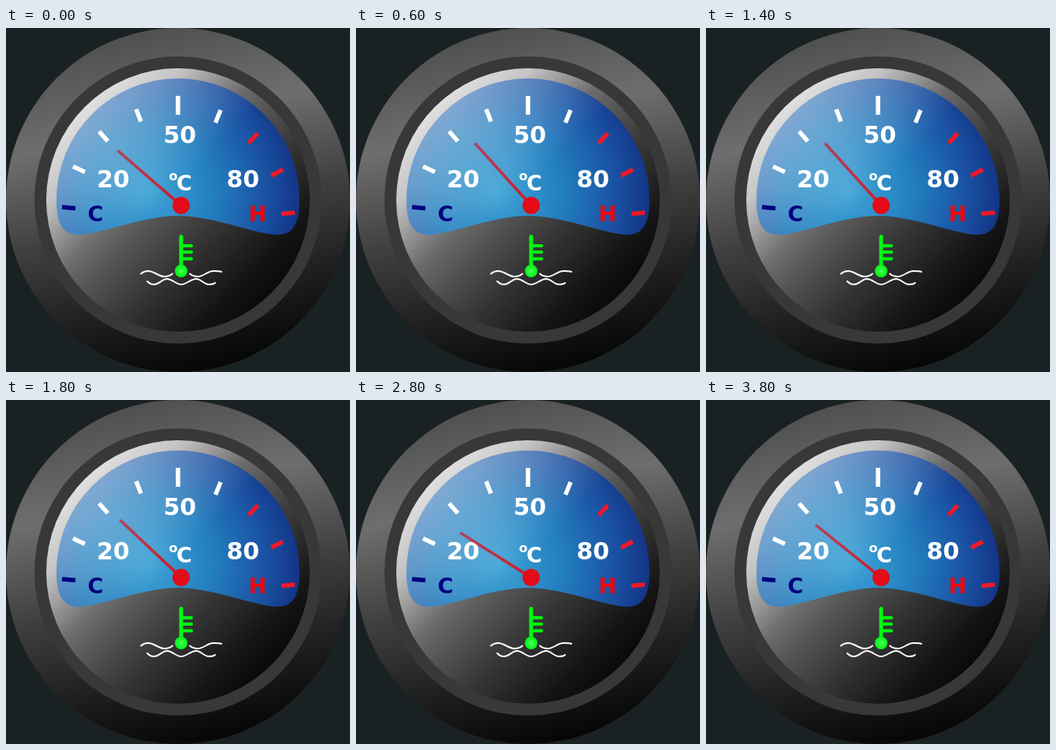
These frames come from a looping animation (436 by 436 pixels, 4 s). An HTML page:

```html
<!DOCTYPE html>
<html lang="en">
<head>
<meta charset="utf-8">
<title>Temperature gauge</title>
<style>
  html, body { margin: 0; width: 100%; height: 100%; overflow: hidden; background: #1a2122; }
  svg { display: block; width: 100vw; height: 100vh; }
  text { font: bold 30px "DejaVu Sans", Verdana, sans-serif; fill: #fff; }
  .letter { font-size: 27px; }
  .degree { font-size: 16px; }
  .ticks { fill: none; stroke-width: 5.5; }
  .needle {
    transform-origin: 222px 225px;
    animation: swing 4s steps(5, end) infinite;
  }
  @keyframes swing {
    0%, 50%, 100% { transform: rotate(40.9deg); }
    25% { transform: rotate(52.6deg); }
    75% { transform: rotate(30.1deg); }
  }
</style>
</head>
<body>
<svg viewBox="0 0 436 436">
  <defs>
    <linearGradient id="bezel" gradientUnits="userSpaceOnUse" x1="165" y1="0" x2="265" y2="430">
      <stop offset="0" stop-color="#4e4e4e"/>
      <stop offset=".28" stop-color="#6e6e6e"/>
      <stop offset=".55" stop-color="#404040"/>
      <stop offset=".8" stop-color="#1e1e1e"/>
      <stop offset="1" stop-color="#060606"/>
    </linearGradient>
    <linearGradient id="dish" gradientUnits="userSpaceOnUse" x1="100" y1="100" x2="340" y2="340">
      <stop offset="0" stop-color="#e0e0e0"/>
      <stop offset=".156" stop-color="#c4c4c4"/>
      <stop offset=".375" stop-color="#6c6c6c"/>
      <stop offset=".48" stop-color="#555"/>
      <stop offset=".65" stop-color="#363636"/>
      <stop offset=".875" stop-color="#141414"/>
      <stop offset="1" stop-color="#080808"/>
    </linearGradient>
    <radialGradient id="blue" gradientUnits="userSpaceOnUse" cx="180" cy="208" r="200">
      <stop offset="0" stop-color="#3fa4d6"/>
      <stop offset=".4" stop-color="#2380c0"/>
      <stop offset=".72" stop-color="#1b55a6"/>
      <stop offset="1" stop-color="#122f82"/>
    </radialGradient>
    <linearGradient id="shine" gradientUnits="userSpaceOnUse" x1="95" y1="95" x2="210" y2="210">
      <stop offset="0" stop-color="#fff" stop-opacity=".5"/>
      <stop offset="1" stop-color="#fff" stop-opacity="0"/>
    </linearGradient>
    <linearGradient id="fade">
      <stop offset="0" stop-color="#d01828" stop-opacity=".72"/>
      <stop offset="1" stop-color="#e01018"/>
    </linearGradient>
    <radialGradient id="bulb">
      <stop offset="0" stop-color="#48ff58"/>
      <stop offset="1" stop-color="#00f410"/>
    </radialGradient>
    <path id="face" d="M64 218A154 154 0 0 1 372 218C372 247 364 262 344 262C318 262 262 238 218 238C174 238 118 262 92 262C72 262 64 247 64 218Z"/>
  </defs>

  <rect width="436" height="436" fill="#1a2122"/>
  <circle cx="218" cy="218" r="218" fill="url(#bezel)"/>
  <circle cx="218" cy="218" r="182" fill="#383838"/>
  <circle cx="218" cy="218" r="167" fill="url(#dish)"/>
  <use href="#face" fill="url(#blue)"/>
  <use href="#face" fill="url(#shine)"/>

  <g class="ticks">
    <path stroke="#000080" d="M71 227L88 228.5"/>
    <path stroke="#fff" d="M85 175.5L100 182.5M118 131L129 143.5M165 103L171 118.5M218 86V110M272 104L265.5 120"/>
    <path stroke="#f01828" d="M319 133.5L307.500 146M351 179.500L336 187M349 235.500L366 234"/>
  </g>

  <text x="199.500" y="146">50</text>
  <text x="115" y="202">20</text>
  <text x="279.500" y="202">80</text>
  <text class="degree" x="206.500" y="193">o</text>
  <text class="letter" x="216" y="206">C</text>
  <text class="letter" x="103.500" y="245" style="fill:#000080">C</text>
  <text class="letter" x="307.500" y="245" style="fill:#f00">H</text>

  <g fill="none" stroke="#fff" stroke-width="2" stroke-linecap="round">
    <path d="M171 311.500C174 309 177 308 180 308C188 308 193 315 201 315C205 315 208 314 211 311.500"/>
    <path d="M233 311.500C236 314 239 315 243 315C251 315 255 308 263 308C267 308 270 308 273 309"/>
    <path d="M179 321C182 324 184 325 187 325C194 325 198 318 204 318C211 318 215 325 222 325C229 325 234 318 241 318C247 318 251 325 257 325C260 325 263 325 265 323"/>
  </g>
  <g fill="none" stroke="#00f810" stroke-linecap="round">
    <path stroke-width="5" d="M222 264.500V308"/>
    <path stroke-width="4" d="M222 276H235M222 284H235M222 292.500H235"/>
  </g>
  <circle cx="222" cy="308" r="8" fill="url(#bulb)"/>

  <g class="needle">
    <rect x="115.500" y="223.250" width="106.500" height="3.500" fill="url(#fade)"/>
  </g>
  <circle cx="222" cy="225" r="11" fill="#e30c18"/>
</svg>
</body>
</html>
```
